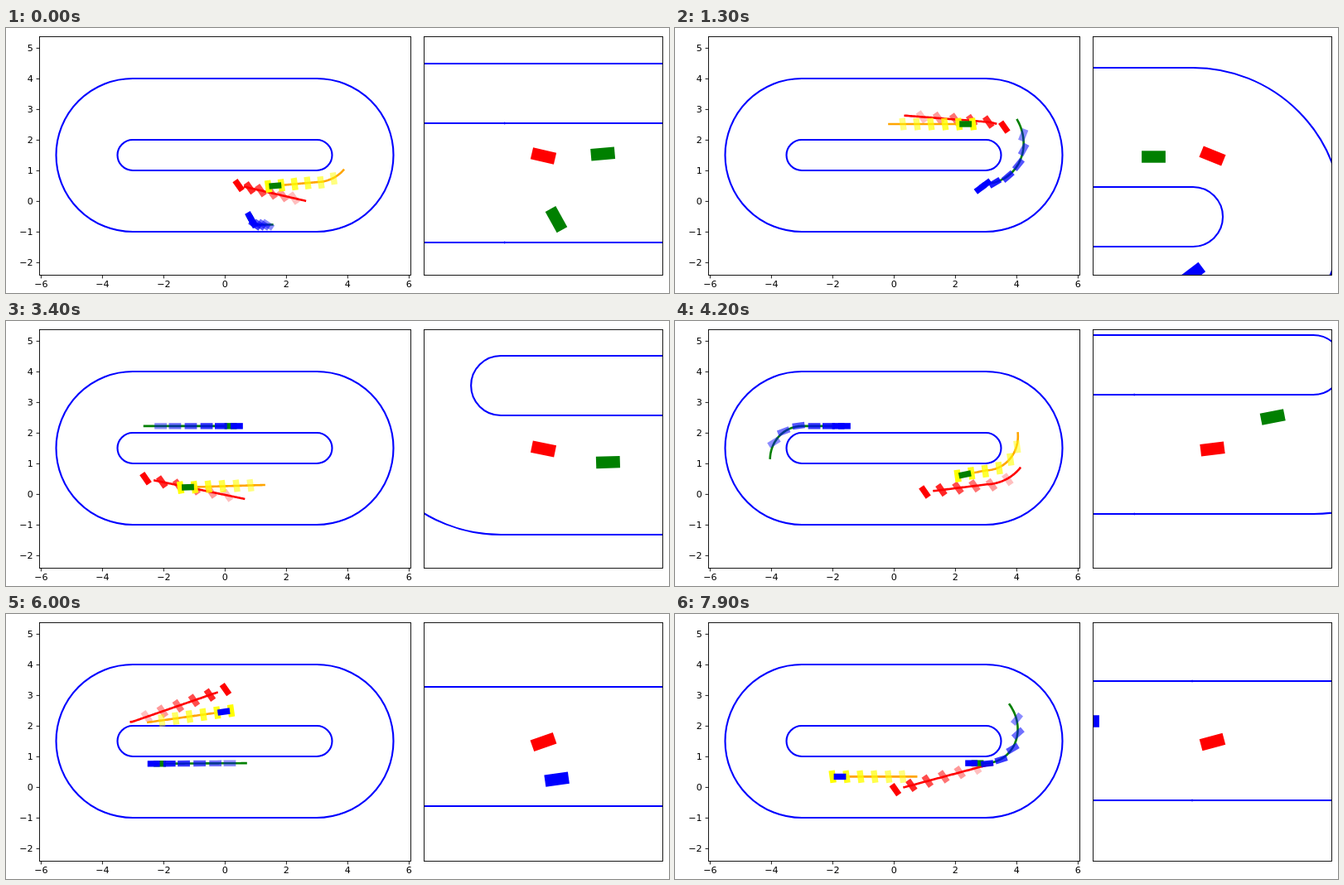
Animation, 800 px wide and 320 px high, one loop 8000 ms. Source, as an HTML page:

```html
<!DOCTYPE html>
<html lang="en">
<head>
<meta charset="utf-8">
<title>Race on an oval track</title>
<style>
html, body { margin: 0; width: 100%; height: 100%; overflow: hidden; background: #fff; }
svg { display: block; }
text { font: 11.1px "DejaVu Sans", sans-serif; fill: #000; }
.frame { fill: none; stroke: #000; stroke-width: .9; }
.tick { stroke: #000; stroke-width: .9; }
.track path { fill: none; stroke: blue; stroke-width: 2.1; vector-effect: non-scaling-stroke; }
.track .notch { stroke-width: 1; }
.plan { fill: none; stroke-width: 2.6; stroke-linecap: square; stroke-linejoin: round; }
</style>
</head>
<body>
<svg id="stage" width="800" height="320" viewBox="0 0 800 320">
  <defs>
    <g id="track" class="track">
      <path d="M0-1H3A2.5 2.5 0 0 1 3 4H-3A2.5 2.5 0 0 1-3-1Z"/>
      <path d="M0 1H3A.5.5 0 0 1 3 2H-3A.5.5 0 0 1-3 1Z"/>
      <path class="notch" d="M0-1.02V-.98M0 .98V1.02"/>
    </g>
  </defs>
  <use href="#track" transform="matrix(37 0 0 -37 264 209)"/>
  <g id="overview"></g>
  <svg x="504.5" y="10.5" width="288" height="288">
    <use id="closeTrack" href="#track"/>
    <g id="closeCars"></g>
  </svg>
  <rect class="frame" x="40.5" y="10.5" width="448" height="288"/>
  <rect class="frame" x="504.5" y="10.5" width="288" height="288"/>
  <g id="axes"></g>
</svg>
<script>
const NS = "http://www.w3.org/2000/svg";
const UNIT = 37, CLOSE = 72, X0 = 264, Y0 = 209;
const MARKS = 6, PLAN_STEPS = 60, DRIFT = .11;
const HALF_STRAIGHT = 3, STRAIGHT = 6, MID_Y = 1.5, WIDEST = 2.27;
const HALF_LAP = STRAIGHT + Math.PI, LAP = 2 * HALF_LAP;

const byId = id => document.getElementById(id);
const deg = a => a * 180 / Math.PI;
const rad = a => a * Math.PI / 180;
const turn = (from, to) => Math.atan2(Math.sin(to - from), Math.cos(to - from));

function set(el, attrs) {
  for (const key in attrs) el.setAttribute(key, attrs[key]);
}
function add(parent, tag, attrs, text) {
  const el = document.createElementNS(NS, tag);
  set(el, attrs);
  if (text !== undefined) el.textContent = text;
  parent.appendChild(el);
  return el;
}

const label = n => String(n).replace("-", "\u2212");
for (let n = -6; n <= 6; n += 2) {
  const x = X0 + n * UNIT + .4;
  add(byId("axes"), "path", { class: "tick", d: `M${x} 298.5v3.9` });
  add(byId("axes"), "text", { x, y: 313, "text-anchor": "middle" }, label(n));
}
for (let n = -2; n <= 5; n++) {
  const y = Y0 - n * UNIT + .4;
  add(byId("axes"), "path", { class: "tick", d: `M40.5 ${y}h-3.9` });
  add(byId("axes"), "text", { x: 32.7, y: y + 4, "text-anchor": "end" }, label(n));
}

// Track coordinates: u runs counter-clockwise (1 rad of a bend = 1), r is the distance from the spine.
const bendPart = u => u % HALF_LAP - STRAIGHT;
const stretch = (u, r) => bendPart(u) > 0 ? r : 1;
const tangent = u => Math.max(bendPart(u), 0) + Math.PI * (Math.floor(u / HALF_LAP) % 2);

function toWorld(u, r) {
  const bend = bendPart(u), a = Math.max(bend, 0);
  const side = u % LAP < HALF_LAP ? 1 : -1;
  const x = Math.min(bend, 0) + HALF_STRAIGHT + r * Math.sin(a);
  return { x: side * x, y: MID_Y - side * r * Math.cos(a) };
}
function toTrack(x, y) {
  y -= MID_Y;
  const first = x > HALF_STRAIGHT || (x >= -HALF_STRAIGHT && y < 0);
  if (!first) { x = -x; y = -y; }
  const over = x - HALF_STRAIGHT, base = first ? 0 : HALF_LAP;
  return over <= 0
    ? { u: base + STRAIGHT + over, r: -y }
    : { u: base + STRAIGHT + Math.atan2(over, -y), r: Math.hypot(over, y) };
}

function hermite(x, x0, y0, m0, x1, y1, m1) {
  const w = x1 - x0, k = (x - x0) / w, e = k * k * (3 - 2 * k);
  return y0 + (y1 - y0) * e + w * k * (1 - k) * (m0 * (1 - k) - m1 * k);
}

// Each car passes these poses (x, y, heading in degrees) at the shared times.
const TIMES = [0, 1.3, 2.6, 4.2, 5.3, 6.7, 7.9];
const cars = [
  { fill: "red", line: "red", step: .54, reach: 2.97, back: .3, fade: .15, grow: .68,
    tilt: () => 55,
    poses: [[.65, .465, -13], [3.326, 2.528, 158], [-3.06, 2.208, 196], [1.31, .104, 7],
      [3.61, 3.146, 145], [-3.63, 1.924, 227], [.34, -.007, 15]] },
  { fill: "yellow", line: "orange", step: .46, reach: 2.49, back: .24, fade: .1, grow: .94,
    tilt: () => 82,
    poses: [[1.645, .5, 5], [2.34, 2.514, 180], [-3.9, 1.81, 238], [2.32, .639, 11],
      [2.235, 2.667, 180], [-2.31, 2.23, 181], [-1.757, .34, 0]] },
  { fill: "blue", line: "green", step: .5, reach: 2.81, back: .2, fade: .11, grow: .28,
    tilt: (h, carH) => -deg(carH + .45 * turn(carH, h)),
    poses: [[.865, -.6, -61], [2.99, .545, 37], [2.2, 2.22, 180], [-1.81, 2.22, 180],
      [-3.65, 1.13, 300], [-.27, .77, 0], [2.73, .78, 0]] }
];

function makeRoute(poses) {
  let last = 0;
  const keys = poses.map(([x, y, heading], i) => {
    const key = toTrack(x, y);
    while (key.u < last) key.u += LAP;
    last = key.u;
    key.t = TIMES[i];
    key.slope = -Math.tan(rad(heading) - tangent(key.u)) * stretch(key.u, key.r);
    return key;
  });
  const rate = i => (keys[i + 1].u - keys[i].u) / (keys[i + 1].t - keys[i].t);
  keys.forEach((key, i) => {
    const before = rate(Math.max(i - 1, 0)), after = rate(Math.min(i, keys.length - 2));
    key.v = 2 * before * after / (before + after);
  });

  return t => {
    let i = 0;
    while (i < keys.length - 2 && t >= keys[i + 1].t) i++;
    const a = keys[i], b = keys[i + 1];
    const u = hermite(t, a.t, a.u, a.v, b.t, b.u, b.v);
    const lane = v => Math.min(hermite(v, a.u, a.r, a.slope, b.u, b.r, b.slope), WIDEST);
    const r = lane(u), e = 1e-3;
    const slope = (lane(u + e) - lane(u - e)) / (2 * e) / stretch(u, r);
    return { u, r, slope, h: tangent(u) - Math.atan(slope), ...toWorld(u, r) };
  };
}

// A plan keeps its sideways slope on straights and drifts wide through bends.
function makePlan(pose, reach) {
  const ds = reach / PLAN_STEPS, points = [];
  let { u, r } = pose, swept = 0;
  for (let i = 0; i <= PLAN_STEPS; i++) {
    const inBend = bendPart(u) > 0;
    let gradient = inBend ? 2 * DRIFT * swept : pose.slope;
    if (r >= WIDEST && gradient > 0) gradient = 0;
    const du = ds / Math.hypot(stretch(u, r), gradient);
    const h = tangent(u) - Math.atan(gradient / stretch(u, r));
    points.push({ ...toWorld(u, r), h });
    u += du;
    r += gradient * du;
    if (inBend) swept += du;
  }
  return points;
}

const box = (parent, w, fill) =>
  add(parent, "rect", { x: -w / 2, y: -w / 4, width: w, height: w / 2, fill });
const place = (el, x, y, angle) => set(el, { transform: `translate(${x} ${y}) rotate(${angle})` });
const leftX = x => X0 + x * UNIT;
const leftY = y => Y0 - y * UNIT;

cars.forEach((car, i) => {
  car.route = makeRoute(car.poses);
  const g = add(byId("overview"), "g", {});
  const addBody = () => box(g, .4 * UNIT);
  car.plan = add(g, "polyline", { class: "plan", stroke: car.line });
  if (i === 2) car.body = addBody();
  car.marks = Array.from({ length: MARKS }, (_, k) => {
    const mark = box(g, .4 * UNIT, car.fill);
    set(mark, { opacity: 1 - car.fade * k });
    return mark;
  });
  if (i === 1) car.body = addBody();
  car.close = box(byId("closeCars"), .4 * CLOSE, car.fill);
});

function drawPlan(car, t) {
  const size = car.grow + (1 - car.grow) * Math.min(t / .7, 1);
  const plan = makePlan(car.pose, car.reach * size);
  set(car.plan, {
    points: plan.map(p => leftX(p.x).toFixed(2) + "," + leftY(p.y).toFixed(2)).join(" ")
  });
  car.marks.forEach((mark, k) => {
    const p = plan[Math.round(k * car.step / car.reach * PLAN_STEPS)];
    const h = k ? p.h : car.pose.h, back = car.back * size;
    place(mark, leftX(p.x - back * Math.cos(h)), leftY(p.y - back * Math.sin(h)),
      car.tilt(h, car.pose.h));
  });
}

function draw(t) {
  cars.forEach(car => {
    car.pose = car.route(t);
    drawPlan(car, t);
  });
  const lead = cars[0].pose;
  cars.forEach(car => {
    const p = car.pose, dx = p.x - lead.x, dy = p.y - lead.y;
    place(car.close, 144 + dx * CLOSE, 144 - dy * CLOSE, -deg(p.h));
    if (!car.body) return;
    // Rivals ahead of the red car are green, those behind are blue.
    const fill = dx * Math.cos(lead.h) + dy * Math.sin(lead.h) > 0 ? "green" : "blue";
    place(car.body, leftX(p.x), leftY(p.y), -deg(p.h));
    set(car.body, { fill });
    set(car.close, { fill });
  });
  // Straight lines sit on whole pixels.
  const cx = 144 - lead.x * CLOSE, cy = Math.round(144 + lead.y * CLOSE) - .5;
  set(byId("closeTrack"), { transform: `matrix(${CLOSE} 0 0 ${-CLOSE} ${cx} ${cy})` });
}

const start = performance.now();
function tick() {
  const ms = (performance.now() - start) % 8000;
  draw(Math.floor(ms / 100) / 10);
  requestAnimationFrame(tick);
}
tick();
</script>
</body>
</html>
```
